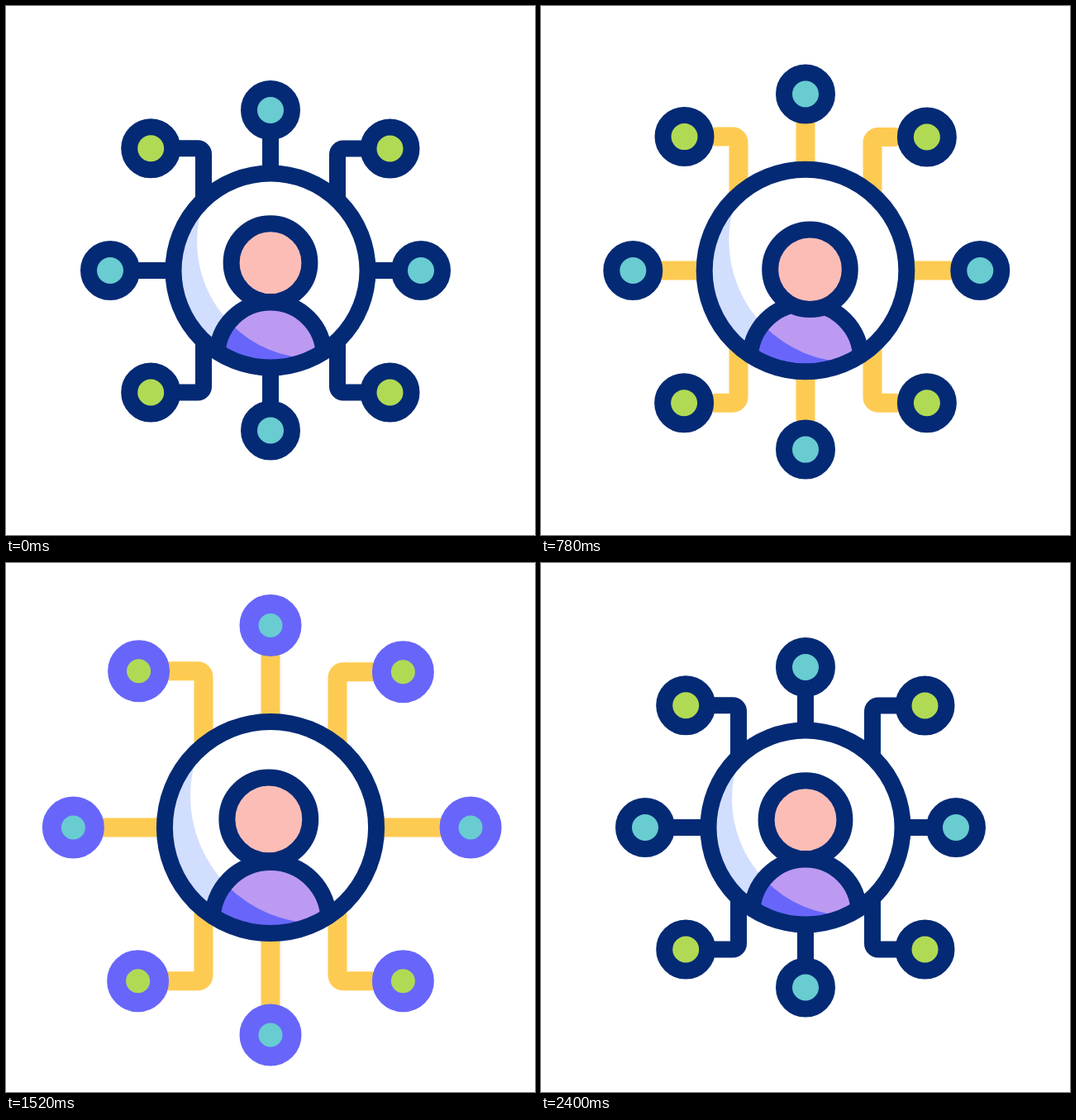
An HTML page with a canvas for the animation above (2800 ms loop, 640 px wide and 640 px high).

```html
<!DOCTYPE html>
<html lang="en">
<head>
<meta charset="utf-8">
<style>
  html, body { margin: 0; width: 100%; height: 100%; overflow: hidden; background: #fff; }
  canvas { display: block; width: 640px; height: 640px; }
</style>
</head>
<body>
<canvas id="stage" width="640" height="640"></canvas>
<script>
const ctx = document.getElementById('stage').getContext('2d');
const LOOP = 2800, MID = 320;
const NAVY = '#042a75', YELLOW = '#fecb52', VIOLET = '#6866fa', LILAC = '#bc9af2';
const PINK = '#fdbdb7', TEAL = '#68ccd1', GREEN = '#b1da54', SHADE = '#d2defe';

// Satellites: resting, drawn-in and extended positions.
const cardinals = [
  { rest: [320, 126], near: [320, 164], far: [320, 74] },
  { rest: [502, 320], near: [474.3, 320], far: [563.5, 320] },
  { rest: [320, 513.5], near: [320, 473], far: [320, 572.5] },
  { rest: [126, 320], near: [166.7, 320], far: [80, 320] }
].map(dot => ({ ...dot, color: TEAL, back: 1793, settle: 2157, fade: 1755 }));
const corners = [
  { rest: [175.2, 172.3], near: [197.4, 208.6], far: [160, 129.5] },
  { rest: [464.5, 172.5], near: [441.9, 207.9], far: [481, 130.5] },
  { rest: [464.5, 467.5], near: [441.9, 433], far: [481, 507] },
  { rest: [175.2, 467.5], near: [198.1, 433], far: [159, 507] }
].map(dot => ({ ...dot, color: GREEN, corner: true, back: 1893, settle: 2254, fade: 1785 }));
const dots = [...corners, ...cardinals];

const mix = (a, b, p) => a + (b - a) * p;
const smooth = p => p * p * (3 - 2 * p);

// Progress of cubic-bezier(k, 0, k, 1): quick start, long glide.
function glide(p, k) {
  let lo = 0, hi = 1;
  for (let i = 0; i < 24; i++) {
    const s = (lo + hi) / 2, r = 1 - s;
    if (3 * k * s * r + s ** 3 < p) lo = s; else hi = s;
  }
  return smooth(lo);
}

const phase = (t, from, to) => Math.min(1, Math.max(0, (t - from) / (to - from)));
const ramp = (t, from, to) => smooth(phase(t, from, to));

// Rest, draw in, extend, draw in, rest.
function breathe(t, rest, near, far, { start, full, back, settle, end, k }) {
  let v = mix(rest, near, ramp(t, 60, start));
  v = mix(v, far, glide(phase(t, start, full), k));
  v = mix(v, near, ramp(t, back, settle));
  return mix(v, rest, ramp(t, settle, end));
}

function track(t, keys) {
  return keys.reduce((v, [time, value], i) =>
    i ? mix(v, value, ramp(t, keys[i - 1][0], time)) : value, 0);
}

function circle(x, y, r) {
  ctx.beginPath();
  ctx.arc(x, y, r, 0, 2 * Math.PI);
}

function fill(color) {
  ctx.fillStyle = color;
  ctx.fill();
}

function stroke(color, width) {
  ctx.strokeStyle = color;
  ctx.lineWidth = width;
  ctx.stroke();
}

// Wire from the ring out to a satellite; only the part [from, to] is drawn.
function wire(dot, x, y, ringR, color, width, from = 0, to = 1) {
  const sx = Math.sign(Math.round(x - MID)), sy = Math.sign(Math.round(y - MID));
  const x0 = MID + sx * (dot.corner ? 81 : ringR);
  const y0 = MID + sy * (dot.corner ? Math.sqrt(ringR * ringR - 81 * 81) : ringR);
  const bend = 7;
  let length = Math.hypot(x - x0, y - y0);
  ctx.beginPath();
  ctx.moveTo(x0, y0);
  if (dot.corner) {
    ctx.arcTo(x0, y, x, y, bend);
    length = Math.abs(y - y0) + Math.abs(x - x0) - bend * (2 - Math.PI / 2);
  }
  ctx.lineTo(x, y);
  if (from > 0 || to < 1) {
    ctx.setLineDash([(to - from) * length, length * 3]);
    ctx.lineDashOffset = -from * length;
    ctx.lineCap = 'round';
  }
  stroke(color, width);
  ctx.setLineDash([]);
  ctx.lineDashOffset = 0;
  ctx.lineCap = 'butt';
}

function satellite(t, dot, ringR) {
  const timing = { start: 300, full: 1780, back: dot.back, settle: dot.settle, end: 2400, k: 0.16 };
  const [x, y] = [0, 1].map(i => breathe(t, dot.rest[i], dot.near[i], dot.far[i], timing));
  wire(dot, x, y, ringR, NAVY, 20);
  const head = ramp(t, 640, 860), tail = ramp(t, 1675, 1925);
  if (head > 0 && tail < 1) wire(dot, x, y, ringR, YELLOW, 23, tail, head);

  circle(x, y, 26);
  fill(dot.color);
  stroke(NAVY, 20);
  ctx.globalAlpha = ramp(t, 780, 920) * (1 - ramp(t, dot.fade, dot.fade + 120));
  stroke(VIOLET, 23);
  ctx.globalAlpha = 1;
}

function person(t, ringR, timing) {
  const s = ringR / 117.5;
  const at = v => MID + (v - MID) * s;
  const light = () => circle(at(372.5), at(285), 141.5 * s);
  const body = () => circle(MID, at(423), 64.5 * s);

  ctx.save();
  circle(MID, MID, ringR);
  fill(SHADE);
  ctx.clip();
  light();
  fill('#fff');
  body();
  fill(VIOLET);
  ctx.save();
  ctx.clip();
  light();
  fill(LILAC);
  ctx.restore();
  body();
  stroke(NAVY, 20);
  ctx.restore();
  circle(MID, MID, ringR);
  stroke(NAVY, 20);

  const headScale = breathe(t, 1, 0.913, 1.065, timing);
  const dx = track(t, [[280, 0], [600, -22], [930, 26], [1260, -16], [1600, 0]]);
  const dy = track(t, [[280, 0], [600, 7], [930, 9.6], [1260, 7.2], [1600, 0]]);
  circle(MID + dx, 338 - 27.3 * headScale + dy, 47.4 * headScale);
  fill(PINK);
  stroke(NAVY, 20);
}

function draw(now) {
  const t = now % LOOP;
  const timing = { start: 280, full: 1680, back: 1685, settle: 2049, end: 2400, k: 0.15 };
  const ringR = breathe(t, 117.5, 109, 128.2, timing);
  ctx.fillStyle = '#fff';
  ctx.fillRect(0, 0, 640, 640);
  dots.forEach(dot => satellite(t, dot, ringR));
  person(t, ringR, timing);
  requestAnimationFrame(() => draw(performance.now()));
}
draw(0);
</script>
</body>
</html>
```
